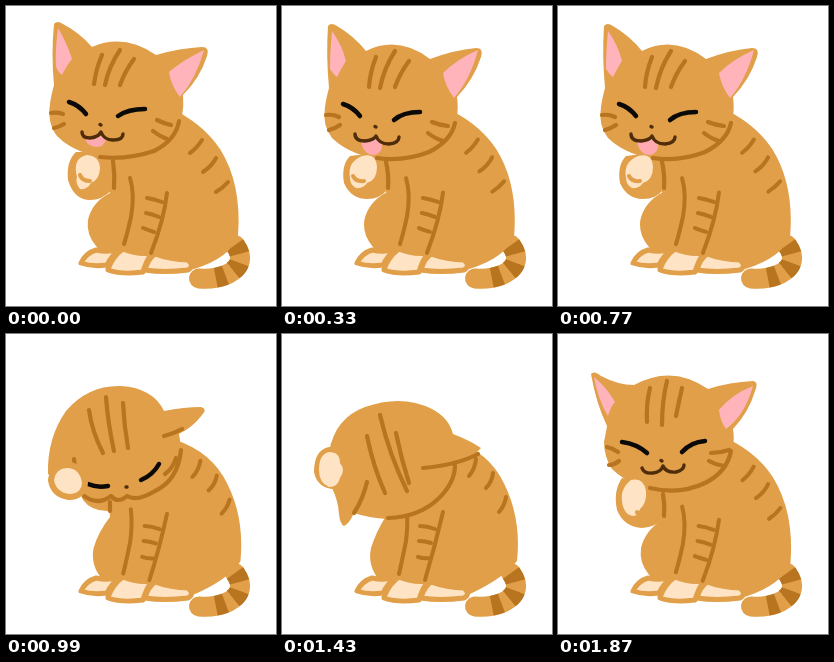
Recreate the animation shown at these times as an HTML page. Size 270 by 300 pixels, loop 1.98 s.

```html
<!DOCTYPE html>
<html lang="en">
<head>
<meta charset="utf-8">
<title>Cat washing its face</title>
<style>
  html, body { margin: 0; width: 100%; height: 100%; overflow: hidden; background: #fff; }
  svg { display: block; width: 100vw; height: 100vh; }
  path { stroke-linecap: round; stroke-linejoin: round; }
</style>
</head>
<body>
<svg id="stage" viewBox="0 0 270 300"></svg>
<script>
const STEP = 110;
const FUR = '#e09f48', STRIPE = '#b8741f', CREAM = '#fee4c4', PINK = '#ffb4bc',
      INK = '#0c0a08', LIP = '#4f2c0a';

// Blend two path strings that share the same commands.
function blendPath(a, b, k) {
  const to = b.match(/-?[\d.]+/g);
  let i = 0;
  return a.replace(/-?[\d.]+/g, n => (+n + (to[i++] - n) * k).toFixed(2));
}

function blend(a, b, k) {
  const out = { lean: a.lean + (b.lean - a.lean) * k };
  for (const key in a) if (key !== 'lean') out[key] = blendPath(a[key], b[key], k);
  return out;
}

// Sitting body: upright and leaning forward.
const upright = {
  body: 'M160 100 Q196 116 214 143 Q236 178 232 230 Q224 252 188 263 L110 262 Q98 250 90 240 Q80 228 82 214 Q86 196 104 187 L100 140 Z',
  lines: 'M124 172 Q129 188 125 211 Q121 229 118 238 M161 187 Q158 214 145 247 M141 192 Q148 193 156 196 M140 207 Q146 208 153 211 M137 222 Q142 224 148 226 M196 134 Q191 142 184 147 M210 152 Q206 160 197 166 M222 176 Q217 182 210 186'
};
const leaning = {
  body: 'M160 104 Q200 112 218 142 Q240 180 235 227 Q222 244 188 260 L110 262 Q98 250 93 240 Q86 228 89 214 Q94 198 104 182 L100 140 Z',
  lines: 'M125 176 Q126 190 124 207 Q120 227 117 240 M161 178 Q153 212 143 246 M138 192 Q145 192 153 195 M137 207 Q143 207 149 209 M136 223 Q142 225 148 224 M194 125 Q193 135 187 142 M211 139 Q210 148 204 154 M224 163 Q223 171 217 178'
};

const lickUp = {
  lean: 0,
  limb: 'M70 146 Q60 155 62 174 Q68 194 84 194 Q96 194 106 184 L110 145 Z',
  head: 'M48 18 Q51 14 57 18 Q74 27 86 41 Q118 27 150 49 Q174 42 196 41 Q204 41 201 50 Q194 72 177 89 Q179 112 169 128 Q145 151 105 152 Q70 149 51 130 Q41 117 44 98 Q45 90 48 79 Q45 48 48 18 Z',
  ears: 'M52 22 Q49 45 50 61 Q52 66 56 69 Q61 59 66 53 Q61 37 52 22 Z M198 44 Q177 54 163 66 Q165 80 174 91 Q190 73 198 44 Z',
  marks: 'M96 49 Q90 63 88 78 M114 44 Q103 60 99 79 M128 53 Q119 65 114 79 M45 107 Q51 106 57 108 M48 122 Q53 121 58 118 M151 114 Q157 117 165 119 M147 125 Q153 130 161 133 M94 151 Q121 154 148 145 Q170 134 173 115 M107 155 Q109 169 108 182',
  eyes: 'M63 96 Q73 99 80 108 M112 110 Q122 103 139 103',
  mouth: 'M94 118.5 L95 119 M76 126 Q76 132 84 132 Q93 131 95 126 Q98 134 107 134 Q117 134 117 128',
  tongue: 'M79 133 Q82 141 91 141 Q99 140 100 133 Q95 130 93 129 Q87 133 79 133 Z',
  paw: 'M81 149 Q94 150 94 163 Q93 174 85 177 Q81 184 74 183 Q69 177 71 171 Q66 152 81 149 Z',
  thumb: 'M74 169 Q76 175 84 175'
};

const lickDown = {
  lean: 0.05,
  limb: 'M68 150 Q59 159 62 177 Q69 193 85 193 Q98 193 105 184 L110 145 Z',
  head: 'M46 20 Q49 16 55 20 Q72 30 84 45 Q116 29 148 53 Q172 44 194 42 Q202 42 199 51 Q192 73 175 91 Q178 114 168 131 Q145 153 105 154 Q70 151 50 132 Q40 119 43 101 Q44 93 47 82 Q44 50 46 20 Z',
  ears: 'M50 25 Q48 46 48 63 Q51 68 55 71 Q60 61 64 55 Q60 39 50 25 Z M196 44 Q175 53 161 67 Q163 80 172 92 Q188 74 196 44 Z',
  marks: 'M94 51 Q88 66 87 81 M113 45 Q102 62 98 82 M127 55 Q118 67 113 81 M44 109 Q51 108 57 111 M47 124 Q52 123 58 119 M150 116 Q157 119 166 120 M146 127 Q152 132 161 135 M95 152 Q121 156 147 146 Q169 135 173 117 M104 156 Q107 169 106 182',
  eyes: 'M61 98 Q71 101 78 110 M112 114 Q121 106 138 106',
  mouth: 'M93 120.5 L94 121 M73 128 Q73 135 83 135 Q92 134 94 130 Q97 138 107 138 Q117 137 117 131',
  tongue: 'M79 136 Q82 149 92 149 Q101 147 100 138 Q95 134 93 132 Q87 136 79 136 Z',
  paw: 'M80 150 Q94 146 95 161 Q95 174 85 177 Q81 183 74 182 Q68 179 68 172 Q65 156 80 150 Z',
  thumb: 'M71 170 Q74 176 82 175'
};

const rest = {
  lean: 0.15,
  limb: 'M64 144 Q55 157 59 176 Q66 193 84 194 Q98 193 107 184 L110 150 Z',
  head: 'M33 40 Q36 36 43 42 Q60 51 76 51 Q114 30 150 55 Q172 48 195 47 Q201 48 197 57 Q191 78 175 95 Q178 115 169 132 Q148 156 118 157 Q75 156 54 135 Q46 123 46 108 Q48 98 49 92 Q38 69 33 40 Z',
  ears: 'M36 43 Q40 66 50 82 Q51 78 53 74 Q55 70 57 68 Q49 54 36 43 Z M195 52 Q174 60 161 76 Q162 87 168 95 Q187 81 195 52 Z',
  marks: 'M92 54 Q88 70 89 88 M109 47 Q104 67 104 91 M124 54 Q121 67 118 82 M49 113 Q54 114 60 118 M51 131 Q56 131 61 127 M153 119 Q162 119 171 116 M151 127 Q158 131 166 132 M92 154 Q122 161 147 149 Q169 138 173 117 M105 160 Q107 171 106 182',
  eyes: 'M64 108 Q79 110 89 119 M124 118 Q133 108 147 107',
  mouth: 'M103 126.5 L104 127 M84 134 Q86 140 95 139 Q103 138 105 132 Q108 139 118 138 Q126 136 126 131',
  tongue: 'M98 138 Q99 139 100 139 Q101 139 102 138 Q101 138 100 138 Q99 138 98 138 Z',
  paw: 'M73 146 Q86 143 88 157 Q89 169 82 175 Q80 181 76 182 Q69 182 66 175 Q59 157 73 146 Z',
  thumb: 'M79 178 Q79 179 80 179'
};

const rise = {
  lean: 0.4,
  limb: 'M60 142 Q51 155 55 171 Q63 186 80 186 Q97 186 107 180 L110 150 Z',
  head: 'M27 71 Q29 68 37 69 Q50 69 63 68 Q108 21 152 60 Q172 56 193 56 Q200 57 196 65 Q190 86 173 100 Q178 117 169 134 Q148 159 118 160 Q75 159 55 139 Q48 127 50 112 Q51 106 50 104 Q36 90 27 71 Z',
  ears: 'M32 78 Q40 98 62 103 Q63 100 63 98 Q63 95 62 93 Q46 87 32 78 Z M195 61 Q173 72 160 87 Q159 93 161 97 Q186 87 195 61 Z',
  marks: 'M91 59 Q90 74 95 91 M108 51 Q106 77 107 104 M123 57 Q123 74 120 91 M53 121 Q56 120 61 118 M56 135 Q62 134 68 129 M154 122 Q163 121 172 117 M152 129 Q159 135 167 136 M88 159 Q120 164 146 151 Q169 138 173 120 M105 163 Q107 172 106 180',
  eyes: 'M66 122 Q81 122 92 129 M124 125 Q134 116 150 115',
  mouth: 'M109 133.5 L110 134 M90 143 Q92 150 101 149 Q109 147 110 141 Q113 148 122 146 Q130 143 130 137',
  tongue: 'M103 147 Q104 148 105 148 Q106 148 107 147 Q106 147 105 147 Q104 147 103 147 Z',
  paw: 'M66 146 Q80 144 82 158 Q82 169 81 173 Q78 178 73 178 Q67 178 63 172 Q54 155 66 146 Z',
  thumb: 'M79 166 Q77 168 80 171'
};

const wipe = {
  lean: 0.8,
  limb: 'M70 150 L77 166 Q86 178 104 177 L120 150 Z',
  head: 'M42 140 Q41 104 60 77 Q82 51 115 52 Q147 54 158 77 Q178 73 195 73 Q202 75 196 81 Q187 93 173 100 Q179 129 161 148 Q148 159 132 164 Q125 168 120 164 Q111 170 105 164 Q90 172 78 163 Z',
  ears: '',
  marks: 'M83 76 Q86 98 97 119 M100 63 Q102 90 108 117 M117 69 Q118 91 122 114 M68 125 Q68 130 70 135 M159 140 Q167 134 170 124 M158 102 Q167 100 176 95 M78 162 Q92 172 105 162 Q112 170 121 162 Q131 168 149 157 Q172 146 175 116 M104 168 L104 177',
  eyes: 'M82 150 Q91 154 102 152 M135 146 Q147 141 153 130',
  mouth: 'M120 153 L121 153',
  tongue: '',
  paw: 'M62 134 Q74 135 76 149 Q75 160 63 160 Q50 158 48 146 Q50 134 62 134 Z',
  thumb: ''
};

const bow = {
  lean: 1,
  limb: 'M47 113 Q61 113 64 130 Q66 150 50 155 Q35 153 32 138 Q32 116 47 113 Z',
  head: 'M47 118 Q53 84 83 73 Q120 60 150 75 Q167 84 171 100 Q187 106 199 114 Q192 123 173 129 Q172 155 153 170 Q132 186 105 185 Q87 184 72 179 Q67 190 62 192 Q58 190 57 180 Q56 166 50 154 Z',
  ears: '',
  marks: 'M85 102 Q91 132 103 159 M98 81 Q107 120 125 157 M114 99 Q119 124 127 149 M141 134 Q175 131 196 120 M106 184 Q137 183 156 165 Q173 149 173 131 M85 148 Q81 165 72 179',
  eyes: '',
  mouth: '',
  tongue: '',
  paw: 'M47 118 Q58 118 58 129 Q64 136 58 144 Q56 153 47 153 Q37 149 37 136 Q37 120 47 118 Z',
  thumb: ''
};

const lick = [0, 0.6, 1.3, 1].map(k => blend(lickUp, lickDown, k));
const poses = [
  ...lick, ...lick,
  blend(lickDown, rise, 0.6), wipe, bow,
  rise, wipe, bow,
  wipe, rise, blend(rise, rest, 0.5), rest
];

const stage = document.getElementById('stage');
function layer(fill, stroke, width, d = '') {
  const el = document.createElementNS('http://www.w3.org/2000/svg', 'path');
  const attrs = { fill, stroke, 'stroke-width': width, d };
  for (const name in attrs) el.setAttribute(name, attrs[name]);
  stage.append(el);
  return el;
}

const tail = 'M229 239 Q242 257 222 268 Q208 274 193 272.5';
layer('none', FUR, 20, tail);
const rings = layer('none', STRIPE, 20, tail);
rings.style.strokeLinecap = 'butt';
rings.setAttribute('stroke-dasharray', '10 9 10 9 10 99');

const parts = { body: layer(FUR, 'none', 0) };
[
  'M75 257 Q80 247 90 244 Q103 247 114 243 Q106 249 101 259 Q86 261 75 257 Z',
  'M139 264 Q142 253 149 248 Q165 254 182 254 Q189 260 182 264 Q158 267 139 264 Z',
  'M102 263 Q107 250 117 243 Q131 249 146 247 Q140 255 137 266 Q116 269 102 264 Z'
].forEach(d => layer(CREAM, FUR, 5, d));
Object.assign(parts, {
  lines: layer('none', STRIPE, 4),
  limb: layer(FUR, 'none', 0),
  head: layer(FUR, 'none', 0),
  ears: layer(PINK, 'none', 0),
  marks: layer('none', STRIPE, 4.2),
  tongue: layer('#ffa9b0', 'none', 0),
  mouth: layer('none', LIP, 3.4),
  eyes: layer('none', INK, 4.5),
  rim: layer('none', FUR, 12), // keeps the lifted paw clear of the white ground
  paw: layer(CREAM, 'none', 0),
  thumb: layer('none', FUR, 4)
});

function show(pose) {
  const shape = {
    ...pose,
    rim: pose === wipe ? pose.paw : '',
    body: blendPath(upright.body, leaning.body, pose.lean),
    lines: blendPath(upright.lines, leaning.lines, pose.lean)
  };
  for (const key in parts) parts[key].setAttribute('d', shape[key]);
}

let shown = -1;
function tick() {
  const now = Math.floor(performance.now() / STEP) % poses.length;
  if (now !== shown) show(poses[shown = now]);
  requestAnimationFrame(tick);
}
tick();
</script>
</body>
</html>
```
